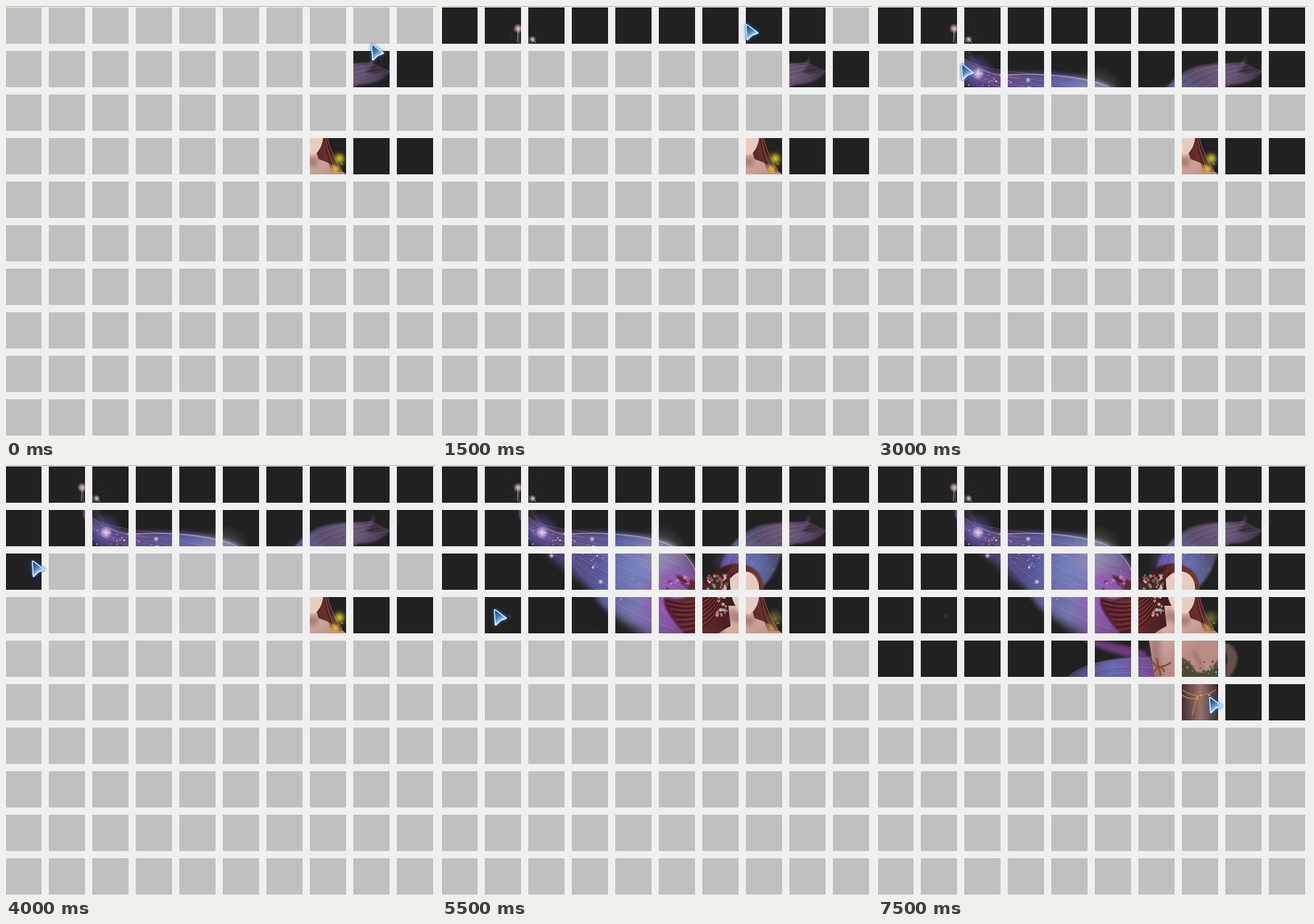
Write an HTML page with a canvas that moves like this. It is 593x594 px and loops after 8000 ms.

```html
<!DOCTYPE html>
<html lang="en">
<head>
<meta charset="utf-8">
<title>Tile reveal</title>
<style>
html, body { margin: 0; width: 100%; height: 100%; overflow: hidden; background: #f0f0f0; }
canvas { display: block; }
</style>
</head>
<body>
<canvas id="stage" width="593" height="594"></canvas>
<script>
const W = 593, H = 594, STEP = 500;
const ctx = document.getElementById('stage').getContext('2d');

// Each step: pointer tip x, y, then the runs of tiles uncovered: [row, first, last]
const steps = [
  [504, 53, [1, 8, 9], [3, 7, 9]],
  [85, 22, [0, 1, 8]],
  [28, 19, [0, 0, 0]],
  [419, 25],
  [565, 24, [0, 9, 9]],
  [358, 72, [1, 6, 7]],
  [115, 80, [1, 2, 5]],
  [20, 96, [1, 0, 1]],
  [36, 132, [2, 0, 0]],
  [542, 146, [2, 1, 9]],
  [284, 200, [3, 5, 6]],
  [72, 199, [3, 1, 4]],
  [25, 239, [3, 0, 0]],
  [396, 261, [4, 0, 6]],
  [576, 269, [4, 7, 9]],
  [457, 320, [5, 7, 9]]
];

let seed = 7;
const rand = () => (seed = seed * 16807 % 2147483647) / 2147483647;
const mix = (a, b, k) => a + (b - a) * k;

const art = document.createElement('canvas');
art.width = W;
art.height = H;
const g = art.getContext('2d');

function shape(path, fill, soft = 0) {
  g.save();
  g.filter = soft ? `blur(${soft}px)` : 'none';
  g.fillStyle = fill;
  g.fill(new Path2D(path));
  g.restore();
}

function line(path, color, width = 1) {
  g.strokeStyle = color;
  g.lineWidth = width;
  g.stroke(new Path2D(path));
}

function ramp(x0, y0, x1, y1, ...colors) {
  const r = g.createLinearGradient(x0, y0, x1, y1);
  colors.forEach((c, i) => r.addColorStop(i / (colors.length - 1), c));
  return r;
}

function glow(c, x, y, r, rgb, alpha) {
  const r0 = c.createRadialGradient(x, y, 0, x, y, r);
  r0.addColorStop(0, `rgba(${rgb},${alpha})`);
  r0.addColorStop(1, `rgba(${rgb},0)`);
  c.fillStyle = r0;
  c.fillRect(x - r, y - r, 2 * r, 2 * r);
}

// A fan of hairlines blended between two cubic curves of eight coordinates
function strands(a, b, count, colors, width = 0.8) {
  for (let i = 0; i < count; i++) {
    const p = a.map((v, j) => mix(v, b[j], i / (count - 1)));
    line(`M${p.slice(0, 2)}C${p.slice(2)}`, colors[i % colors.length], width);
  }
}

function dots(count, x, y, w, h, slope, colors, size) {
  for (let i = 0; i < count; i++) {
    const k = rand();
    g.fillStyle = colors[i % colors.length];
    g.beginPath();
    g.arc(x + w * k, y + slope * k + h * rand(), size * (0.4 + rand() * 0.6), 0, 7);
    g.fill();
  }
}

function paintWings() {
  const lilac = ['rgba(190,150,210,.45)', 'rgba(110,105,190,.4)', 'rgba(185,120,160,.4)'];
  const main = ramp(110, 70, 350, 180, '#40324f', '#51406f', '#54579a', '#7878b0', '#784a88');

  // Left wing and its trailing tip
  shape('M107 60C116 84 138 95 178 93C230 90 286 94 320 110Q352 128 362 172L346 238H282C248 226 224 202 207 175Q158 140 124 107Q108 88 107 60Z', main, 3);
  glow(g, 262, 140, 48, '125,145,205', 0.6);
  glow(g, 300, 122, 40, '180,175,160', 0.45);
  glow(g, 312, 185, 48, '175,75,195', 0.7);
  glow(g, 135, 92, 27, '110,105,220', 0.65);
  shape('M124 110Q180 139 217 180L180 175Q145 145 124 110Z', 'rgba(33,33,33,.5)', 5);
  shape('M222 196Q252 215 292 236H230Z', 'rgba(33,33,33,.8)', 6);
  strands([106, 50, 112, 98, 200, 85, 318, 108], [106, 70, 138, 130, 215, 100, 347, 170], 13, lilac);
  strands([170, 105, 230, 110, 270, 135, 348, 160], [175, 130, 210, 180, 250, 200, 320, 226], 13, lilac, 0.7);
  strands([108, 30, 100, 55, 120, 95, 180, 95], [124, 46, 128, 75, 145, 100, 200, 101], 5, lilac, 0.9);
  line('M178 95C235 92 291 98 320 113Q342 125 351 150', 'rgba(204,183,181,.7)', 1.3);
  dots(55, 120, 78, 100, 38, 34, ['#e7c6dc', '#9985c6', '#b98cab'], 1.4);
  dots(60, 205, 110, 135, 65, 35, ['#b3a5e0', '#c47fd1', '#6d8bca'], 0.9);
  dots(45, 85, 10, 60, 42, 0, ['#493d59', '#382f42'], 0.8);
  [[105, 31, 7], [125, 46, 5], [138, 93, 9], [207, 102, 4], [151, 125, 4], [219, 161, 4]].forEach(([x, y, r]) => {
    glow(g, x, y, r, '255,225,235', 0.9);
  });
  line('M105 31L104 50M125 46L130 51M132 93H144M138 87V99', 'rgba(222,205,240,.7)', 1);

  // Right wing with two feather tips
  shape('M382 165C380 124 406 96 437 84Q470 77 499 80Q507 74 506 66Q512 79 496 91Q514 97 533 87Q518 108 487 108Q470 113 463 137Q455 156 440 170Z',
    ramp(390, 165, 515, 80, '#5c4d91', '#58689b', '#534b66', '#66566f', '#40354b'), 1.5);
  glow(g, 430, 137, 34, '105,125,205', 0.55);
  glow(g, 396, 130, 24, '120,85,180', 0.5);
  strands([391, 150, 400, 95, 445, 82, 505, 78], [426, 166, 435, 115, 475, 103, 530, 90], 12, lilac);
  strands([478, 107, 500, 92, 530, 100, 541, 64], [479, 110, 510, 100, 538, 95, 544, 72], 3, ['rgba(100,80,115,.35)']);
  dots(70, 420, 66, 100, 44, -6, ['#4d435c', '#383143'], 0.7);
  dots(30, 475, 120, 50, 32, -8, ['#403653', '#302a3a'], 0.7);
  dots(18, 420, 118, 40, 38, 0, ['#8db0e0', '#a578c6'], 1);

  // Lower left wing
  shape('M280 239Q325 243 370 257V268Q318 263 280 239Z', '#6a3c7c', 2);
  shape('M257 296Q295 264 376 264L388 296Z', ramp(260, 290, 380, 270, '#443b66', '#6266ac', '#73498b'), 1.5);
  strands([262, 294, 280, 270, 340, 266, 376, 267], [300, 296, 320, 285, 350, 282, 384, 294], 7, lilac);
}

function paintFigure() {
  const skin = ramp(395, 170, 450, 240, '#e9d0c5', '#d7b0a5', '#b98d86');

  // Flowing hair
  shape('M404 136Q437 136 443 164Q443 179 439 188Q451 212 446 224L412 234H338Q325 225 312 204Q304 192 307 181Q330 191 345 176Q329 164 322 151Q348 159 364 165Q374 139 404 136Z',
    ramp(310, 200, 440, 170, '#512035', '#632a2b', '#3d1a20', '#70332f'), 1);
  strands([397, 145, 372, 178, 357, 201, 307, 183], [402, 146, 382, 210, 371, 226, 333, 231], 14, ['rgba(155,68,54,.6)', 'rgba(45,12,24,.7)'], 1.3);
  strands([398, 140, 429, 136, 443, 157, 438, 177], [397, 148, 422, 146, 434, 158, 435, 170], 5, ['rgba(155,75,60,.6)']);

  // Neck, shoulders, torso and arms
  shape('M395 194H426L431 211Q453 218 468 231L475 260Q468 279 464 296L471 356H428Q411 310 409 296H382L374 243Q376 233 398 222Z', skin, 0.6);
  shape('M410 298H466L472 356H410Z', ramp(418, 0, 472, 0, '#442c30', '#98706a', '#2b282b'));
  shape('M374 243Q378 229 391 229L389 260L393 296H381Z', 'rgba(118,75,75,.45)', 3);
  shape('M470 243Q493 245 496 265Q495 286 475 300L479 277Q487 262 470 250Z', '#62504e', 1.5);
  shape('M433 252Q447 264 449 283Q438 277 433 252Z', 'rgba(139,88,82,.45)', 2);
  shape('M418 265Q430 269 439 285L449 286Q463 279 469 267V296H418Z', '#4b4938', 1);
  dots(32, 419, 270, 50, 21, 0, ['#9a7951', '#385d5b', '#b1a087', '#70422c'], 1.8);

  // Plain face and strands falling over the shoulder
  shape('M397 157Q407 144 421 147Q436 150 438 172Q438 194 427 204Q421 208 411 201Q397 190 397 157Z', '#e6cdc2', 0.5);
  shape('M398 195Q419 214 432 207L427 222L395 214Z', 'rgba(118,70,67,.45)', 3);
  strands([438, 164, 438, 187, 440, 207, 451, 229], [442, 166, 441, 188, 453, 210, 464, 229], 6, ['#68292c', '#3c1b24', '#8a5143'], 1.2);

  // Blossoms, bracelet and necklace
  dots(35, 366, 150, 27, 23, 0, ['#d8b8a9', '#6c9295', '#9f4d52', '#516a49'], 2.6);
  dots(22, 379, 181, 16, 27, 0, ['#c2776c', '#83a4b5', '#d4b091'], 2.3);
  dots(18, 305, 146, 40, 26, 8, ['#a752ab', '#c67bc2', '#6e367c'], 3);
  line('M378 270Q385 285 404 272M380 286Q389 271 395 285M384 266L390 290', '#8f4733', 2.2);
  line('M420 310Q440 325 466 310M419 317Q436 328 445 316M440 318L433 345', '#b28751', 1.3);
  dots(8, 425, 312, 35, 11, 0, ['#dfbf82', '#8090b5'], 1.5);
  glow(g, 459, 211, 13, '155,145,60', 0.65);
  glow(g, 454, 225, 10, '200,150,65', 0.8);
  dots(10, 449, 207, 17, 18, 0, ['#9b883f', '#685b35'], 1);
}

g.fillStyle = '#212121';
g.fillRect(0, 0, W, H);
paintWings();
paintFigure();
glow(g, 93, 208, 5, '65,65,65', 0.6);

function pointer(x, y) {
  const arrow = new Path2D('M1 1L2 21L8 15L16 12Z');
  const fill = ctx.createLinearGradient(2, 4, 11, 17);
  fill.addColorStop(0, '#214d83');
  fill.addColorStop(0.5, '#4e86bd');
  fill.addColorStop(1, '#c9e8fa');
  ctx.save();
  ctx.translate(x, y);
  ctx.lineJoin = 'round';
  ctx.shadowColor = '#2676c8';
  ctx.shadowBlur = 4;
  ctx.strokeStyle = '#5b9cda';
  ctx.lineWidth = 3.2;
  ctx.stroke(arrow);
  ctx.shadowBlur = 0;
  ctx.strokeStyle = '#fff';
  ctx.lineWidth = 2;
  ctx.stroke(arrow);
  ctx.fillStyle = fill;
  ctx.fill(arrow);
  ctx.restore();
}

function draw(now) {
  const step = Math.floor(now / STEP) % steps.length;
  ctx.fillStyle = '#f0f0f0';
  ctx.fillRect(0, 0, W, H);
  ctx.fillStyle = '#b2b2b2';
  ctx.fillRect(0, 0, W, 1);

  ctx.fillStyle = '#c0c0c0';
  for (let i = 0; i < 100; i++) {
    ctx.fillRect(i % 10 * 60 - 1, Math.floor(i / 10) * 60 + 2, 50, 50);
  }
  for (const [, , ...runs] of steps.slice(0, step + 1)) {
    for (const [row, first, last] of runs) {
      for (let col = first; col <= last; col++) {
        const x = Math.max(0, col * 60 - 1), y = row * 60 + 2, w = col ? 50 : 49;
        ctx.drawImage(art, x, y, w, 50, x, y, w, 50);
      }
    }
  }
  // The butterfly is brighter early on
  if (step < 9) {
    glow(ctx, 460, 210, 8, '220,215,20', 0.9);
    glow(ctx, 454, 225, 7, '235,190,50', 0.9);
  }
  pointer(steps[step][0], steps[step][1]);
}

const start = performance.now();
function tick() {
  draw(performance.now() - start);
  requestAnimationFrame(tick);
}
tick();
</script>
</body>
</html>
```
